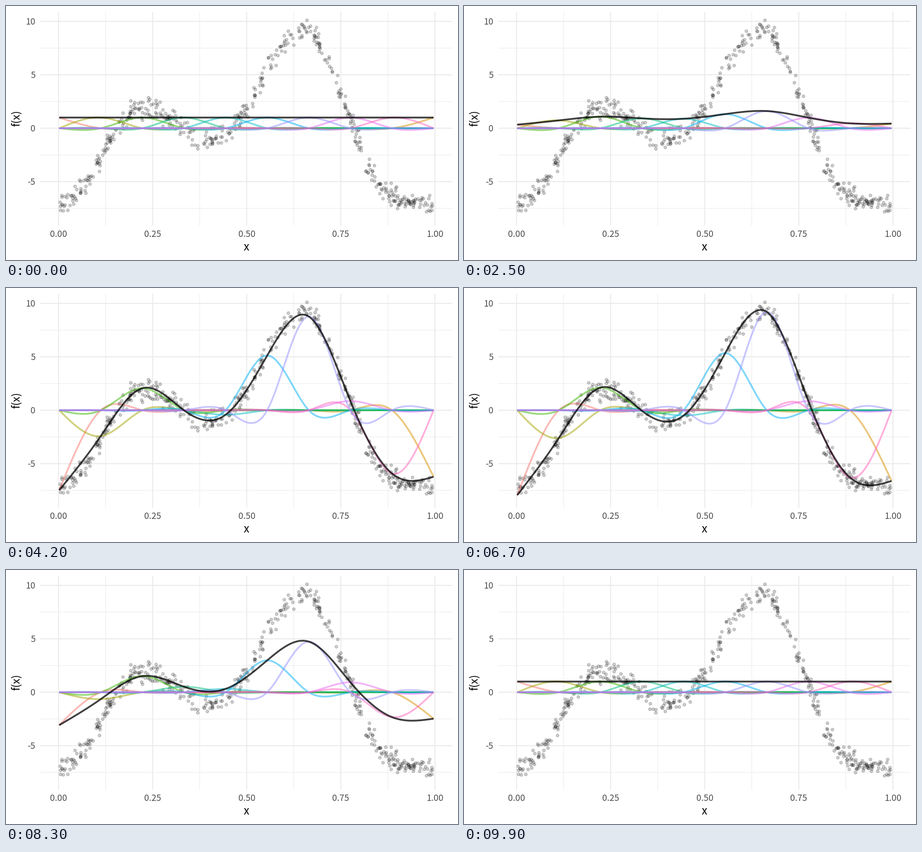
A matplotlib script that plays this animation: 998x561 px, repeating every 10 s.

```python
import numpy as np
import matplotlib.pyplot as plt
from matplotlib.animation import FuncAnimation

W, H, DPI = 998, 561, 100
FRAMES, INTERVAL = 100, 100
PT = 72 / DPI                      # points per pixel
FONT = "Noto Sans CJK JP"
X_MIN, X_MAX, K = 0.0018, 0.9965, 10
N_POINTS, NOISE = 500, 0.5


def px(x):
    return 116 + 831 * np.asarray(x)


def py(y):
    return 270 - 23.6 * np.asarray(y)


def true_curve(x):
    return 1e6 * x**11 * (1 - x)**6 + 1e4 * x**3 * (1 - x)**10 - 6.99


def cardinal_splines(x, knots):
    """Natural cubic splines, each 1 at its own knot and 0 at the others."""
    n, h = len(knots), knots[1] - knots[0]
    lhs = np.eye(n)
    rhs = np.zeros((n, n))
    for i in range(1, n - 1):
        lhs[i, i - 1:i + 2] = 1, 4, 1
        rhs[i, i - 1:i + 2] = np.array([1, -2, 1]) * 6 / h**2
    curvature = np.linalg.solve(lhs, rhs)
    j = np.clip(((x - knots[0]) / h).astype(int), 0, n - 2)
    b = ((x - knots[j]) / h)[:, None]
    a = 1 - b
    values = np.eye(n)
    return (a * values[j] + b * values[j + 1]
            + ((a**3 - a) * curvature[j] + (b**3 - b) * curvature[j + 1]) * h**2 / 6)


def ease(u):
    u = min(max(u, 0), 1)
    return 4 * u**3 if u < 0.5 else 1 - 4 * (1 - u)**3


def fit_weight(i):
    return ease((i - 16) / 34) if i <= 66 else 1 - ease((i - 66) / 33)


def label(x, y, text, size, color, **kw):
    ax.text(x, y, text, fontsize=size * PT, color=color, family=FONT, **kw)


fig = plt.figure(figsize=(W / DPI, H / DPI), dpi=DPI, facecolor="white")
ax = fig.add_axes([0, 0, 1, 1])
ax.set_xlim(0, W)
ax.set_ylim(H, 0)
ax.axis("off")

# grid: minor lines first, then major
LEFT, RIGHT, TOP, BOTTOM = 76, 985.5, 13, 485
grid = dict(color="#ebebeb", snap=False, solid_capstyle="butt", zorder=1)
for shift, width in ((1, 1.15), (0, 2.3)):
    for x in np.arange(0.125 * shift, 1.01, 0.25):
        ax.plot([px(x)] * 2, [TOP, BOTTOM], lw=width * PT, **grid)
    for y in np.arange(-5 - 2.5 * shift, 10.1, 5):
        ax.plot([LEFT, RIGHT], [py(y)] * 2, lw=width * PT, **grid)

for x in np.linspace(0, 1, 5):
    label(px(x), 510, f"{x:.2f}", 19.4, "#4d4d4d", ha="center", va="baseline")
for y in range(-5, 11, 5):
    label(65, py(y) + 7, str(y), 19.4, "#4d4d4d", ha="right", va="baseline")
label(530.5, 540.5, "x", 24.5, "black", ha="center", va="baseline")
label(22.8, 247.5, "f(x)", 24, "black", ha="center", va="center", rotation=90)

rng = np.random.default_rng(12)
pts_x = rng.uniform(X_MIN, X_MAX, N_POINTS)
pts_y = true_curve(pts_x) + rng.normal(0, NOISE, N_POINTS).clip(-1.2, 1.2)
ax.scatter(px(pts_x), py(pts_y), s=(6.6 * PT)**2, facecolor=(0, 0, 0, 0.2),
           edgecolor=(0, 0, 0, 0.2), linewidth=1.2 * PT, zorder=2)

xs = np.linspace(X_MIN, X_MAX, 400)
basis = cardinal_splines(xs, np.linspace(X_MIN, X_MAX, K))
# heights of the fitted curve at the knots
fitted = np.array([-7.95, -2.6, 2.12, -0.06, -0.5, 5.35, 9.2, 0.85, -6.3, -6.62])

COLORS = ["#F8766D", "#A3A500", "#39B600", "#00BF7D", "#00BFC4",
          "#00B0F6", "#9590FF", "#E76BF3", "#FF62BC", "#D89000"]
STACK = [0, 9, 1, 4, 2, 3, 5, 7, 8, 6]   # bottom to top

stroke = dict(lw=3.9 * PT, snap=False, solid_capstyle="butt", solid_joinstyle="round")
curves = [ax.plot([], [], color=c, alpha=0.5, zorder=3 + STACK.index(k) / K, **stroke)[0]
          for k, c in enumerate(COLORS)]
total, = ax.plot([], [], color="black", alpha=0.75, zorder=5, **stroke)


def update(i):
    w = fit_weight(i)
    parts = basis * ((1 - w) + w * fitted)
    for k, curve in enumerate(curves):
        curve.set_data(px(xs), py(parts[:, k]))
    total.set_data(px(xs), py(parts.sum(axis=1)))
    return curves + [total]


anim = FuncAnimation(fig, update, frames=FRAMES, interval=INTERVAL,
                     repeat=True, repeat_delay=0, blit=False)
plt.show()
```
